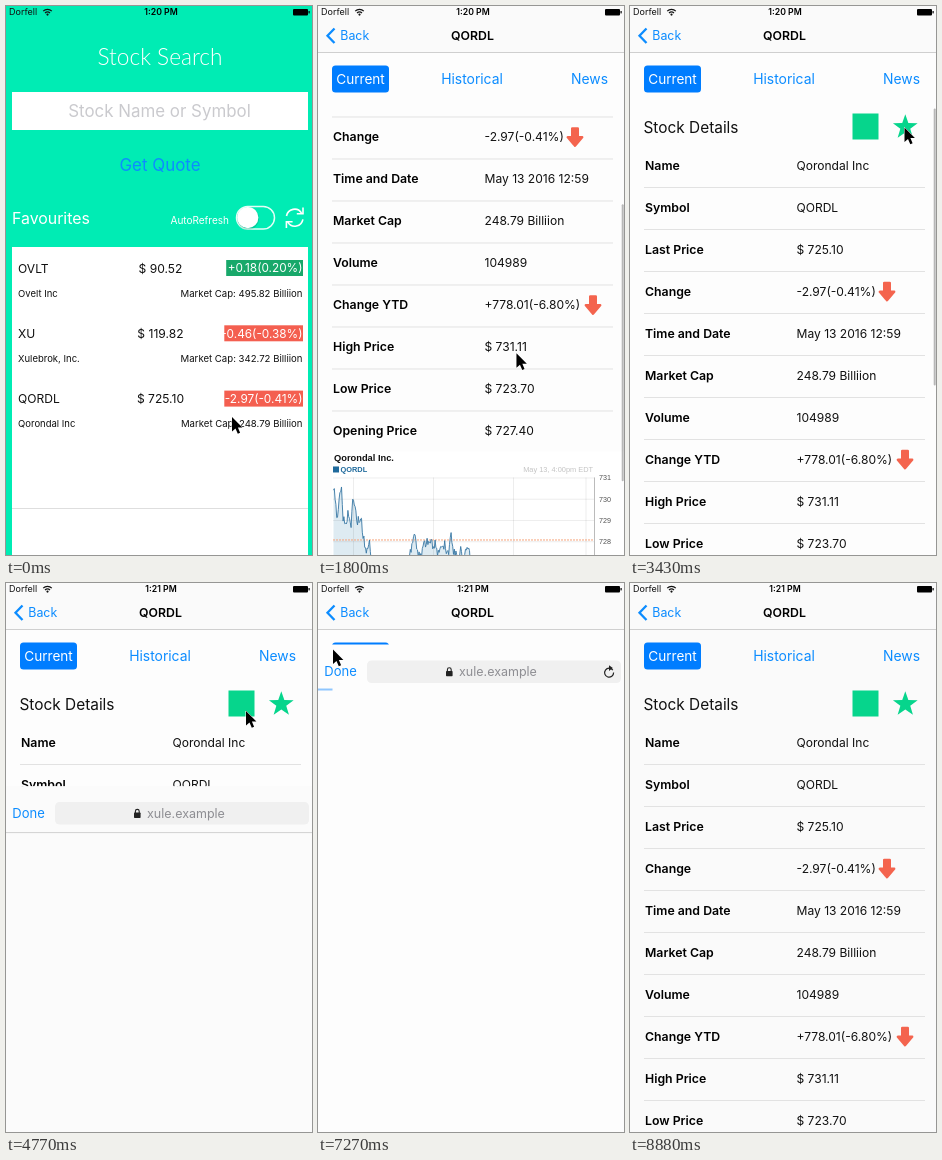
Recreate the animation shown at these times as an HTML page. Size 306x549 px, loop 9330 ms.

```html
<!DOCTYPE html>
<html lang="en">
<head>
<meta charset="utf-8">
<title>Stock app demo</title>
<style>
html, body { margin: 0; width: 100%; height: 100%; overflow: hidden; background: #fdfdfd; }
svg { display: block; width: 306px; height: 549px; font-family: Inter, "Open Sans", sans-serif; }
text { white-space: pre; }
</style>
</head>
<body>
<svg id="stage" viewBox="0 0 306 549" xmlns="http://www.w3.org/2000/svg"></svg>
<script>
const W = 306, H = 549, LOOP = 9330;
const BLUE = '#0c8cff', GREEN = '#06d58c', RED = '#f4644e', MINT = '#00ecb4', PAGE = '#fdfdfd';

// ---------- drawing helpers ----------
const text = (x, y, s, size, fill = '#111', more = '') =>
  `<text x="${x}" y="${y}" font-size="${size}" fill="${fill}" ${more}>${s}</text>`;
const rect = (x, y, w, h, fill, more = '') =>
  `<rect x="${x}" y="${y}" width="${w}" height="${h}" fill="${fill}" ${more}/>`;
const path = (d, more) => `<path d="${d}" ${more}/>`;
const line = (d, color, w = 1, more = '') =>
  path(d, `fill="none" stroke="${color}" stroke-width="${w}" ${more}`);
const group = (id, body) => `<g id="${id}">${body}</g>`;
const BOLD = 'font-weight="600"', MID = 'text-anchor="middle"', END = 'text-anchor="end"';

// ---------- favourites list ----------
function favourite(i, symbol, name, price, change, cap) {
  const y = 262 + i * 65.3, up = change[0] === '+';
  const width = change.length * 5.9 + (up ? 6 : 2);
  return text(12, y + 4.5, symbol, 12.1) +
    text(154.5, y + 4.5, price, 12.1, '#111', MID) +
    rect(297 - width, y - 8, width, 16, up ? '#18a86a' : '#f45f50') +
    text(296.5, y + 4.3, change, 11.8, '#fff', END) +
    text(12, y + 28.7, name, 9.5) +
    text(296.5, y + 28.7, `Market Cap: ${cap} Billiion`, 9.6, '#111', END);
}

function listScreen() {
  const arc = 'M280.5 210A8.2 8.2 0 0 1 295.5 207M297 201.5V207.7H290.8';
  const refresh = line(arc, '#fff', 1.6) + line(arc, '#fff', 1.6, 'transform="rotate(180 288.7 211.7)"');
  return rect(0, 0, W, H, MINT) +
    text(154, 58.5, 'Stock Search', 22.7, '#fff', MID + ' font-weight="300" font-family="Lato, sans-serif"') +
    rect(6, 86, 296, 38, '#fff') +
    text(153.5, 111, 'Stock Name or Symbol', 16.9, '#cacace', MID) +
    text(154, 165, 'Get Quote', 16.9, BLUE, MID) +
    text(6, 218, 'Favourites', 15.9, '#fff') +
    text(164.5, 218, 'AutoRefresh', 10, '#fff') +
    rect(230.5, 200.5, 38, 22.5, MINT, 'rx="11.2" stroke="#e4fff7" stroke-width="1.5"') +
    '<circle cx="242" cy="212.6" r="11" fill="#000" opacity=".13"/>' +
    '<circle cx="241.8" cy="211.6" r="10.6" fill="#fff"/>' +
    refresh +
    rect(6, 241, 296, 308, '#fff') +
    rect(6, 371.5, 296, 65, '#d9d9d9', 'id="pressed"') +
    favourite(0, 'OVLT', 'Ovelt Inc', '$ 90.52', '+0.18(0.20%)', '495.82') +
    favourite(1, 'XU', 'Xulebrok, Inc.', '$ 119.82', '-0.46(-0.38%)', '342.72') +
    favourite(2, 'QORDL', 'Qorondal Inc', '$ 725.10', '-2.97(-0.41%)', '248.79') +
    rect(6, 502, 296, 1, '#dedede') +
    rect(0, 0, W, H, '#000', 'id="dim"');
}

// ---------- detail page ----------
function star(cx, cy, r) {
  let d = '';
  for (let i = 0; i < 10; i++) {
    const a = -Math.PI / 2 + i * Math.PI / 5, k = i % 2 ? r * 0.4 : r;
    d += `${i ? 'L' : 'M'}${cx + k * Math.cos(a)} ${cy + k * Math.sin(a)}`;
  }
  return path(d + 'Z', `fill="${GREEN}"`);
}

const downArrow = (x, y) =>
  path('M-2.8 -8.5H2.8V0.3H7.2L0 8.8L-7.2 0.3H-2.8Z',
    `transform="translate(${x} ${y})" fill="${RED}" stroke="${RED}" stroke-width="2.4" stroke-linejoin="round"`);

function random(seed) {
  return () => (seed = (seed * 16807) % 2147483647) / 2147483647;
}

// Trend every 20 px with a jittery walk on top, wildest at the opening
function priceLine() {
  const trend = [385, 382, 432, 462, 420, 422, 420, 448, 460, 448, 496, 500, 476, 476];
  const rnd = random(71);
  let d = '', noise = 0;
  for (let x = 15.5; x <= 276; x += 0.8) {
    const p = (x - 15) / 20, i = Math.min(12, Math.floor(p));
    const mid = trend[i] + (trend[i + 1] - trend[i]) * (p - i);
    noise = noise * 0.76 + (rnd() - 0.5) * (17 + 24 * Math.exp(-p));
    const y = 353 + Math.abs(mid + noise - 353);
    d += `${d ? 'L' : 'M'}${x.toFixed(1)} ${y.toFixed(1)}`;
  }
  return d;
}

function chart() {
  const d = priceLine(), dashed = 'stroke-dasharray="2 1"', faint = 'opacity=".07"';
  let s = rect(14, 326, 292, 223, '#fff') +
    text(16, 335.5, 'Qorondal Inc.', 9.3, '#111', 'font-weight="700"') +
    rect(15, 341, 6, 6, '#1f6a9c') +
    text(22.5, 347, 'QORDL', 7.4, '#1f6a9c', 'font-weight="700"') +
    text(275, 347, 'May 13, 4:00pm EDT', 7.4, '#c4c4c4', END) +
    path(d + 'V523.5H15.5Z', 'fill="#deebf2"');
  for (let i = 0; i < 9; i++) {
    const y = 352.5 + i * 21.25;
    s += line(`M15 ${y}H277`, '#000', 1, faint) + text(281, y + 2.5, 731 - i, 7.2, '#555');
  }
  ['10am', '12pm', '2pm', '4pm'].forEach((label, i) => {
    const x = Math.min(268, 35.5 + i * 80);
    s += line(`M${x} 352V523`, '#000', 1, faint) + text(x, 534, label, 8.2, '#444', MID);
  });
  s += line('M15 414.5H277', '#f5a27a', 1, dashed) +
    line(d, '#3878a4', 0.9, 'stroke-linejoin="round"') +
    line('M276.5 352V523.5H15', '#bbb') +
    text(19, 520.5, '© Wuzmo!', 7.2, '#777') +
    line('M208 544.5H222', '#f5a27a', 1, dashed) +
    text(275, 547, 'Previous Close', 7.3, '#777', END);
  return `<g transform="translate(0 274)" font-family="Liberation Sans, Arial, sans-serif">${s}</g>`;
}

function detailScreen() {
  const rows = [['Name', 'Qorondal Inc'], ['Symbol', 'QORDL'], ['Last Price', '$ 725.10'],
    ['Change', '-2.97(-0.41%)', 257], ['Time and Date', 'May 13 2016 12:59'],
    ['Market Cap', '248.79 Billiion'], ['Volume', '104989'],
    ['Change YTD', '+778.01(-6.80%)', 275], ['High Price', '$ 731.11'],
    ['Low Price', '$ 723.70'], ['Opening Price', '$ 727.40']];
  let body = text(13.5, 126.8, 'Stock Details', 15.4) +
    rect(222.5, 107.5, 26, 26, GREEN) + star(275.3, 121.2, 13);
  rows.forEach(([label, value, arrow], i) => {
    const y = 159.5 + i * 42;
    body += text(15, y + 4.4, label, 12.3, '#000', BOLD) + text(166.5, y + 4.4, value, 12.05);
    if (arrow) body += downArrow(arrow, y);
    if (i < 10) body += rect(14, y + 21.5, 281, 1, '#e2e2e2');
  });
  return rect(0, 0, W, H, PAGE, 'id="page"') +
    rect(14, 59.5, 57, 27, '#007dff', 'rx="3.5"') +
    text(42.5, 78, 'Current', 13.6, '#fff', MID) +
    text(154, 78, 'Historical', 13.9, BLUE, MID) +
    text(271.5, 78, 'News', 13.9, BLUE, MID) +
    `<g clip-path="url(#view)">${group('content', body + chart())}</g>` +
    rect(303.7, 0, 2, 277, '#000', 'id="thumb" rx="1" opacity=".28"');
}

const navBar = () =>
  rect(0, 0, W, 46, '#fafafa') + rect(0, 46, W, 1, '#cfcfcf') +
  line('M16.5 22.5L9.5 29.7L16.5 37', BLUE, 2.3) +
  text(22.3, 34, 'Back', 12.4, BLUE) +
  text(154.5, 34, 'QORDL', 12.3, '#000', MID + ' ' + BOLD);

// ---------- browser sheet ----------
const browser = () =>
  rect(0, 0, W, H, '#fbfbfb', 'id="sheet"') +
  rect(0, 46, W, 1, '#d2d2d2', 'id="rule"') +
  text(6.3, 31.8, 'Done', 13, BLUE) +
  rect(49, 16, 254, 22.5, '#f0f0f0', 'rx="4.5"') +
  rect(128, 26.5, 6.6, 5.3, '#222', 'rx=".7"') +
  line('M129.4 27V25.2A1.9 1.9 0 0 1 133.2 25.2V27', '#222', 1.1) +
  text(141, 31.6, 'xule.example', 12.5, '#8e8e93') +
  group('reload', line('M294.8 25.6A4.5 4.5 0 1 0 295.6 28', '#222', 1.2) +
    path('M291 20.8L294.8 23.6L291 26.4Z', 'fill="#222"')) +
  rect(0, 44, 35, 2, '#0a84ff', 'id="bar"') +
  line('M21 527L14.5 533.7L21 540.5M99.5 527L106 533.7L99.5 540.5', '#cbcbcb', 1.2) +
  line('M190 529.5H185.5V542.5H200V529.5H195.5M192.7 537V523.5M189.3 526.8L192.7 523.4L196.1 526.8', BLUE, 1.1) +
  `<circle cx="286.5" cy="534" r="9" fill="${BLUE}"/>`;

const statusBar = () =>
  text(3, 9.2, 'Dorfell', 9) +
  line('M37.2 5.2A6 6 0 0 1 45.8 5.2M39 7A3.6 3.6 0 0 1 44 7', '#111', 1.2) +
  '<circle cx="41.5" cy="8.6" r="1.1" fill="#111"/>' +
  text(155, 9.2, '1:20 PM', 8.7, '#000', MID + ' id="clock" ' + BOLD) +
  rect(287, 3, 15, 6.4, '#000', 'rx="1"') + rect(302.5, 5, 1.2, 2.4, '#000');

const pointer = path('M0 0V14.6L3.5 11.5L5.8 16.7L8.1 15.7L5.9 10.6H10.4Z',
  'fill="#000" stroke="#fff" stroke-width="1" paint-order="stroke"');

document.getElementById('stage').innerHTML =
  `<defs><clipPath id="view">${rect(0, 100, W, 449, '#000')}</clipPath></defs>` +
  group('list', listScreen()) + group('detail', detailScreen()) + group('nav', navBar()) +
  group('browser', browser()) + group('status', statusBar()) + group('cursor', pointer);

// ---------- motion ----------
const el = {};
document.querySelectorAll('#stage [id]').forEach(n => el[n.id] = n);
const set = (id, name, value) => el[id].setAttribute(name, value);
const move = (id, x, y) => set(id, 'transform', `translate(${x.toFixed(2)} ${y.toFixed(2)})`);
const show = (id, on) => set(id, 'display', on ? 'inline' : 'none');

// The picture advances in even ticks between a still start and a still end
const FIRST = 300, LAST = 8880, STEP = (LAST - FIRST) / 58;
const tick = t => t < FIRST ? 0 : t >= LAST ? LAST : FIRST + Math.floor((t - FIRST) / STEP) * STEP;

const ramp = (t, a, b) => Math.min(1, Math.max(0, (t - a) / (b - a)));
const ease = (t, a, b) => { const p = ramp(t, a, b); return p * p * (3 - 2 * p); };

// Critically damped spring, 1 falling to 0
function spring(t, start) {
  const k = Math.max(0, t - start) * 0.0155;
  return (1 + k) * Math.exp(-k);
}

// Pointer strokes: start, end, then where it comes to rest
const strokes = [[300, 700, 195, 352], [1400, 2300, 204, 339.5], [2900, 3400, 274.5, 121.5],
  [3650, 4600, 240, 128], [5900, 6690, 20, 25], [7100, 7250, 15, 66.5], [7900, 8400, -16, 20]];

function pointerAt(t) {
  let x = 226, y = 411;
  for (const [a, b, toX, toY] of strokes) {
    const e = ease(t, a, b);
    x += (toX - x) * e;
    y += (toY - y) * e;
  }
  return [x, y];
}

function draw(time) {
  const t = tick(time);

  // list to detail push
  const off = W * spring(t, 300);
  show('list', t < 1000);
  show('pressed', t >= 300);
  move('list', -92 * (1 - off / W), 0);
  set('dim', 'opacity', 0.08 * (1 - off / W));
  show('detail', t >= 300);
  show('nav', t >= 300);
  move('detail', off, 0);
  move('nav', off >= W ? W : Math.max(0, off - 3), 0);
  set('page', 'fill', t > 8100 ? '#fafafa' : PAGE);

  // scroll down and back
  const scroll = 274 * (ease(t, 1280, 2200) - ease(t, 2480, 3200));
  move('content', 0, -scroll);
  set('thumb', 'y', 102.5 + scroll * 0.62);
  show('thumb', t > 1300 && t < 3500);

  // browser sheet up, load, down
  const drop = t < 7000 ? spring(t, 4600) : 1 - spring(t, 7216);
  const loaded = t >= 6500;
  show('browser', t > 4600 && t < 7800);
  move('browser', 0, H * drop);
  set('sheet', 'fill', loaded ? PAGE : '#fbfbfb');
  show('rule', !loaded);
  show('reload', loaded);
  set('bar', 'width', loaded ? 14.5 : W * ramp(t, 5450, 6400) ** 2);
  set('bar', 'opacity', loaded ? 0.45 : 1);

  el.clock.textContent = t < 3800 ? '1:20 PM' : '1:21 PM';
  move('cursor', ...pointerAt(t));
}

const begin = performance.now();
function loop(now) {
  draw(Math.max(0, now - begin) % LOOP);
  requestAnimationFrame(loop);
}
draw(0);
requestAnimationFrame(loop);
</script>
</body>
</html>
```
